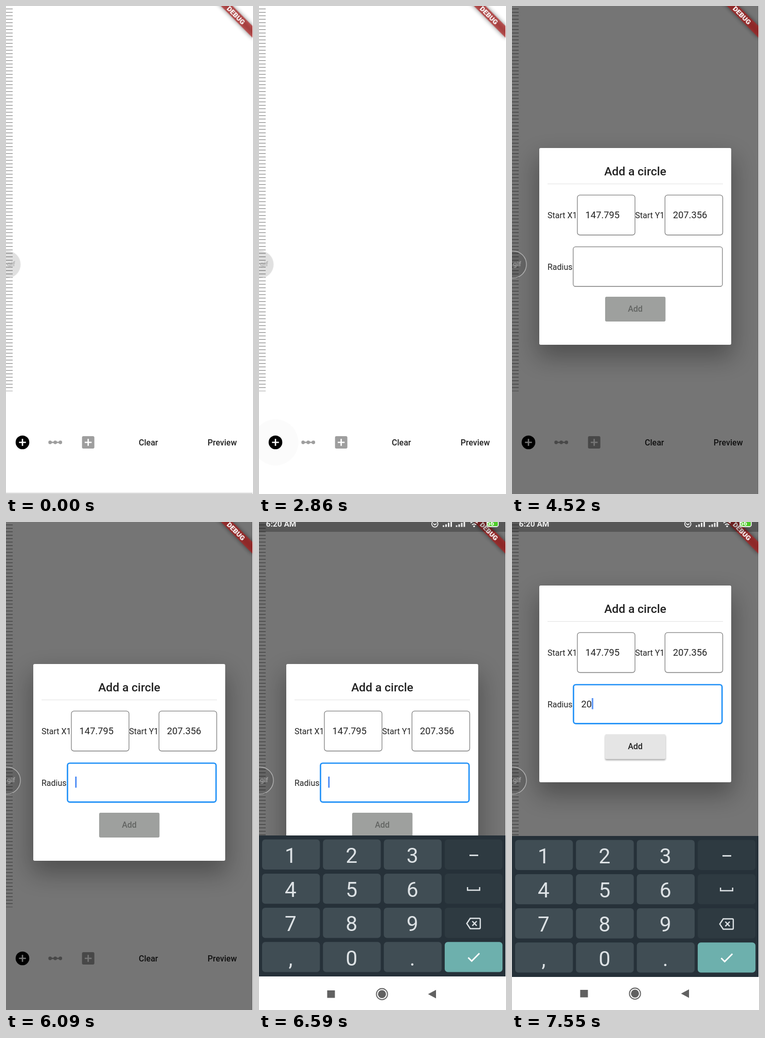
Write an HTML page that moves like this. It is 480 px wide and 945 px high and loops after 8000 ms.

```html
<!DOCTYPE html>
<html lang="en">
<head>
<meta charset="utf-8">
<title>Add a circle</title>
<style>
  html, body { margin: 0; width: 100%; height: 100%; overflow: hidden; background: #fff; }
  svg { display: block; width: 100vw; height: 100vh; font-family: Roboto, Arial, sans-serif; }
  .anim { animation: 8s linear infinite; }
  .step { animation: 8s step-end infinite; }
  .mid { text-anchor: middle; }
  .med { font-weight: 500; }
  .s16 { font-size: 16px; }
  .s18 { font-size: 18.3px; }
  .field { fill: none; stroke: #808080; stroke-width: 1.3; }
  .digit { font-size: 40.5px; fill: #dde2e5; text-anchor: middle; }
  .icon { fill: none; stroke: #dde2e5; stroke-width: 2.4; }
  .blur5 { filter: blur(4.5px); }
  .blur24 { filter: blur(24px); }

  /* 1% = 80 ms */
  #edge { animation-name: edge; }
  @keyframes edge { 0% { opacity: 1 } 1.125%, 100% { opacity: 0 } }

  #ripple { animation-name: ripple; transform-origin: 32px 845px; }
  @keyframes ripple {
    0%, 35.7% { opacity: 0; transform: scale(.9) }
    35.75% { opacity: .04; transform: scale(.95) }
    36.875% { opacity: .2; transform: scale(1) }
    38% { opacity: .12; transform: scale(1) }
    39%, 100% { opacity: 0; transform: scale(1) }
  }

  #barrier, #fade { animation-name: open; }
  @keyframes open {
    0% { opacity: 0 } 53% { opacity: .06 } 54% { opacity: .37 }
    55.25% { opacity: .85 } 56.5%, 100% { opacity: 1 }
  }

  #dialog { animation-name: lift; }
  @keyframes lift {
    0%, 83.3% { transform: none; animation-timing-function: ease-out }
    84.625%, 100% { transform: translateY(-152px) }
  }

  /* the outline thickens inwards */
  #radius { animation-name: focus; }
  @keyframes focus {
    0%, 69.125% { stroke: #808080; stroke-width: 1.3px; x: 118.9px; y: 466.3px; width: 290px; height: 76.7px }
    73%, 100% { stroke: #2191f7; stroke-width: 2.67px; x: 119.5px; y: 467px; width: 288.7px; height: 75.3px }
  }

  #caret { animation-name: caret; }
  @keyframes caret {
    0% { opacity: 0; transform: none }
    71.375% { opacity: 1; transform: none }
    88.625% { opacity: 1; transform: translateX(10.3px) }
    94.375%, 100% { opacity: 1; transform: translateX(20.6px) }
  }
  #two { animation-name: two; }
  @keyframes two { 0% { opacity: 0 } 88.625%, 100% { opacity: 1 } }
  #zero { animation-name: zero; }
  @keyframes zero { 0% { opacity: 0 } 94.375%, 100% { opacity: 1 } }

  #addBox { animation-name: addBox; }
  @keyframes addBox { 0%, 88.625% { fill: #9ea09e } 91%, 100% { fill: #e5e5e5 } }
  #addShade { animation-name: addShade; filter: blur(1.6px); }
  @keyframes addShade { 0%, 88.625% { opacity: 0 } 92.5%, 100% { opacity: .32 } }
  #addText { animation-name: addText; }
  @keyframes addText { 0%, 88.625% { fill: #626462 } 91%, 100% { fill: #222 } }

  #keys { animation-name: keys; }
  @keyframes keys {
    0%, 79% { transform: translateY(340px); animation-timing-function: cubic-bezier(.2, .6, .3, 1) }
    82.3%, 83.5% { transform: translateY(-1px) }
    84.625%, 100% { transform: none }
  }
  #nav { animation-name: nav; }
  @keyframes nav {
    0%, 79% { transform: translateY(66px); animation-timing-function: ease-out }
    82.3%, 83.5% { transform: translateY(1px) }
    84.625%, 100% { transform: none }
  }
  #status { animation-name: status; }
  @keyframes status {
    0%, 79% { transform: translateY(-22px); animation-timing-function: ease-out }
    82%, 100% { transform: none }
  }
  #press2 { animation-name: press2; }
  @keyframes press2 { 0% { opacity: 0 } 87.625% { opacity: .16 } 89.625% { opacity: .08 } 90.625%, 100% { opacity: 0 } }
  #press0 { animation-name: press0; }
  @keyframes press0 { 0% { opacity: 0 } 92.5% { opacity: .16 } 94.375%, 100% { opacity: 0 } }
</style>
</head>
<body>
<svg viewBox="0 0 480 945" preserveAspectRatio="none">
  <rect width="480" height="945" fill="#fff"/>

  <!-- ruler -->
  <path d="M6.5 5V745.8" stroke="#8a8a8a" stroke-width="13" stroke-dasharray="1.25 5.4167"/>
  <path id="edge" class="step" d="M0 943.5H480" stroke="#aaa"/>

  <!-- toolbar -->
  <circle id="ripple" class="anim" cx="32" cy="845" r="46.7" fill="#999"/>
  <circle cx="32" cy="845" r="13.3"/>
  <rect x="147.7" y="833" width="24" height="24" rx="2.7" fill="#9e9e9e"/>
  <path d="M25.3 845h13.4M32 838.3v13.4M153 845h13.4M159.7 838.3v13.4" stroke="#fff" stroke-width="2.67"/>
  <g fill="#9e9e9e">
    <circle cx="85.7" cy="845" r="3.4"/><circle cx="95.7" cy="845" r="3.4"/><circle cx="105.7" cy="845" r="3.4"/>
    <rect x="86" y="843.7" width="20" height="2.67"/>
  </g>
  <g class="s16 med mid" fill="#222">
    <text x="276.8" y="850.5">Clear</text>
    <text x="420.2" y="850.5">Preview</text>
  </g>

  <rect id="barrier" class="step" width="480" height="945" fill="rgba(0,0,0,.54)"/>

  <g id="dialog" class="anim">
    <g id="fade" class="step">
      <rect class="blur24" x="49" y="294" width="381" height="386" opacity=".32"/>
      <rect x="53" y="275" width="373" height="381" rx="2.7" fill="#fff"/>
      <text class="mid med" x="239.5" y="328" font-size="22.9" fill="#222">Add a circle</text>
      <path d="M69 344.5H410" stroke="#e2e2e2"/>
      <g class="s16" fill="#222">
        <text x="69" y="410.5">Start X1</text>
        <text x="239.3" y="410.5">Start Y1</text>
        <text x="69" y="510.5">Radius</text>
      </g>
      <rect class="field" x="127" y="366.2" width="112" height="77.3" rx="5"/>
      <rect class="field" x="297.3" y="366.2" width="112.2" height="77.3" rx="5"/>
      <rect id="radius" class="field anim" rx="4.5"/>
      <g class="s18" fill="#222">
        <text x="142.6" y="411.3">147.795</text>
        <text x="312.8" y="411.3">207.356</text>
        <text id="two" class="step" x="134.5" y="511.3">2</text>
        <text id="zero" class="step" x="144.8" y="511.3">0</text>
      </g>
      <rect id="caret" class="step" x="134.5" y="493" width="2.67" height="21.5" fill="#4285f4"/>
      <rect id="addShade" class="anim" x="181" y="565" width="117.5" height="48.5" rx="2.7"/>
      <rect id="addBox" class="anim" x="181" y="563" width="117.3" height="48" rx="2.7"/>
      <text id="addText" class="anim s16 med mid" x="239.5" y="592">Add</text>
    </g>
  </g>

  <!-- corner ribbon -->
  <g transform="translate(479 -14) rotate(45)">
    <rect class="blur5" x="-53.3" y="37.3" width="106.7" height="16" opacity=".5"/>
    <rect x="-53.3" y="37.3" width="106.7" height="16" fill="#b71c1c" fill-opacity=".66"/>
    <text class="mid" y="50.1" font-size="13.6" font-weight="900" fill="#fff">DEBUG</text>
  </g>

  <g id="status" class="anim">
    <rect y="-4" width="480" height="23" fill="rgba(0,0,0,.25)"/>
    <text x="13.5" y="9" font-size="15.5" font-weight="700" fill="#eee">6:20 AM</text>
    <g fill="none" stroke="#eee" stroke-width="1.8">
      <circle cx="341.7" cy="3.8" r="6"/>
      <path d="M338.5 3l3.2 2.5 3-2.5"/>
      <path d="M411 2q7-6 14 0M414 5.5q4-3.5 8 0"/>
      <path id="bars" stroke-width="3" d="M358.5 9.5v-3M363.5 9.5v-5M368.5 9.5v-8M373.5 9.5v-12"/>
      <use href="#bars" x="25.5"/>
      <rect x="443" y="-5" width="22" height="14" rx="3.5" fill="#4ccb28"/>
    </g>
    <circle cx="418" cy="8.3" r="1.8" fill="#eee"/>
    <text class="mid" x="450" y="7.2" font-size="12" font-weight="700" fill="#fff">56</text>
  </g>

  <g id="keys" class="anim">
    <rect y="608" width="480" height="273" fill="#263139"/>
    <rect y="881" width="480" height="70" fill="#fff"/>
    <g id="pad"></g>
    <rect id="press2" class="step" x="124.3" y="615.7" width="112.3" height="58.3" rx="6" fill="#fff"/>
    <rect id="press0" class="step" x="124.3" y="814.3" width="112.3" height="58.3" rx="6" fill="#fff"/>
    <g class="icon">
      <path d="M409 646.5h17" stroke-width="2.8"/>
      <path d="M405.2 708v6h23.6v-6"/>
      <path d="M410.5 768.5h17.5q2 0 2 2v16q0 2-2 2h-17.5l-6.7-10zM414.5 774l8.6 8.8M423.1 774l-8.6 8.8"/>
      <path d="M406.5 844.5l6.8 6.7 15-15" stroke="#fff" stroke-width="2.8"/>
    </g>
  </g>

  <g id="nav" class="anim" fill="#616161">
    <rect y="881" width="480" height="70" fill="#fff"/>
    <rect x="132.5" y="906" width="15" height="14.5"/>
    <circle cx="239" cy="913.3" r="10.8" fill="none" stroke="#616161" stroke-width="1.8"/>
    <circle cx="239" cy="913.3" r="7.8"/>
    <path d="M328.5 913.3l15.5-8.3v16.6z"/>
  </g>

  <!-- floating recorder bubble -->
  <circle cx="2" cy="500.5" r="26" fill="rgba(0,0,0,.12)" stroke="rgba(225,225,225,.6)" stroke-width="1.4"/>
  <text x="2" y="504" font-size="13.5" font-weight="500" fill="#aaa" fill-opacity=".85">gif</text>

  <!-- the screen is one pixel narrower than the stage -->
  <rect x="479" width="1" height="945" fill="#fff"/>
</svg>
<script>
  const NS = 'http://www.w3.org/2000/svg';
  const pad = document.getElementById('pad');

  function add(tag, attrs, text = '') {
    const el = document.createElementNS(NS, tag);
    for (const name in attrs) el.setAttribute(name, attrs[name]);
    el.textContent = text;
    pad.append(el);
  }

  // A blank stands for a function key in the last column.
  [...'123 456 789 ,0. '].forEach((label, i) => {
    const col = i % 4, row = Math.floor(i / 4);
    const x = 6 + col * 118.3, y = 615.7 + row * 66.2;
    const fill = i === 15 ? '#6db0ad' : col === 3 ? '#2e3a41' : '#404d54';
    add('rect', { x, y, width: 112.3, height: 58.3, rx: 6, fill });
    if (label !== ' ') add('text', { x: x + 55.5, y: y + 45.3, class: 'digit' }, label);
  });
</script>
</body>
</html>
```
